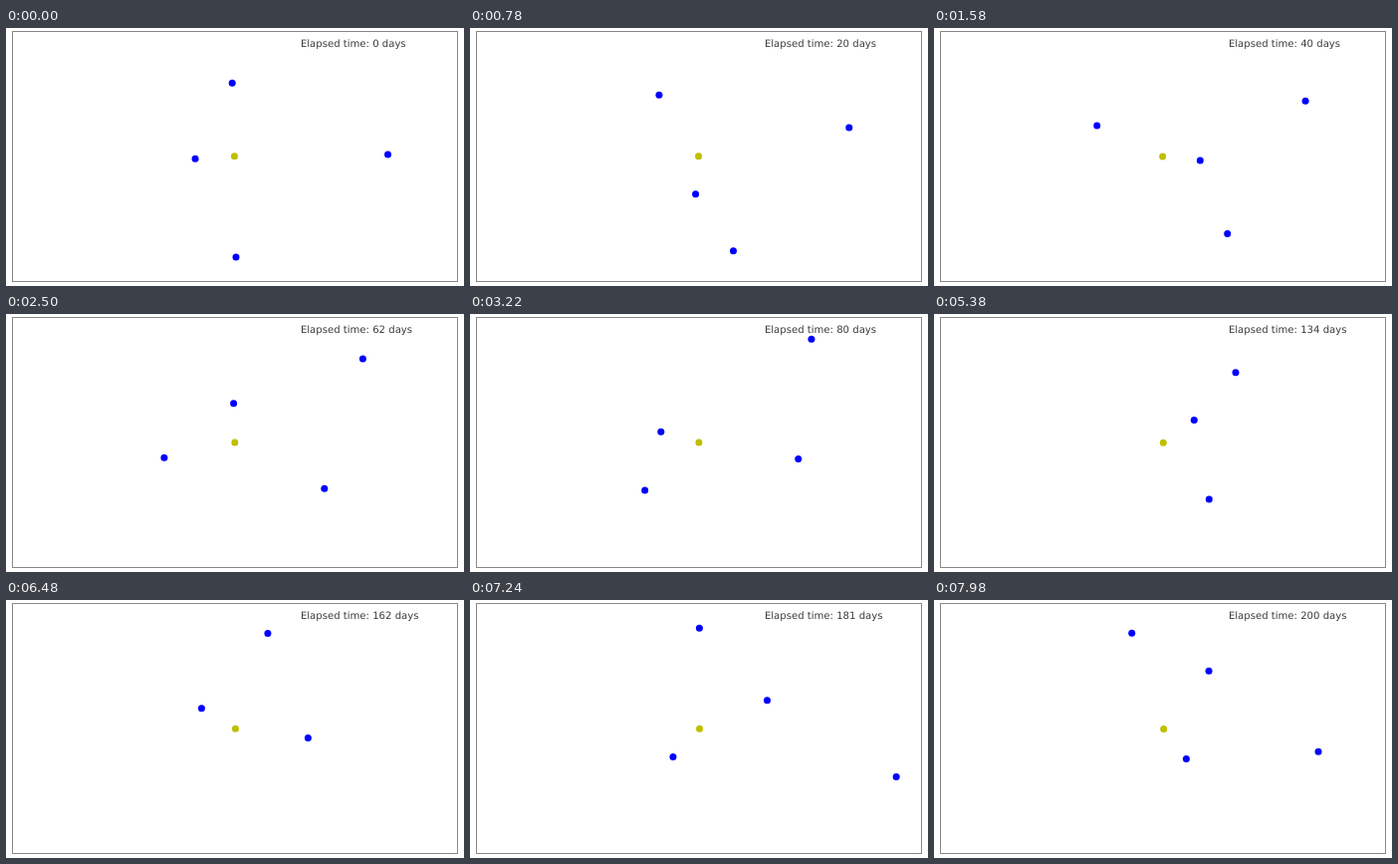
Animation of 460x259 px, one loop 8000 ms. Source, as an HTML page with a canvas:

```html
<!DOCTYPE html>
<html lang="en">
<head>
<meta charset="utf-8">
<title>Inner planets</title>
<style>
  html, body { margin: 0; width: 100%; height: 100%; overflow: hidden; background: #fff; }
  canvas { display: block; }
</style>
</head>
<body>
<canvas id="stage" width="460" height="259"></canvas>
<script>
const ctx = document.getElementById('stage').getContext('2d');
const LOOP = 8000, STEP = 20, DAYS_PER_STEP = 0.5;
const BOX = [6.5, 3.5, 447, 251];
const RAD = Math.PI / 180;

// Orbit radius in px, angles in degrees, rate in degrees per day
const planets = [
  { radius: 38.7,  start: 185.6, rate: 4.221,  ecc: 0.026,  perihelion: 320 },
  { radius: 73.1,  start: 92.5,  rate: 1.6025, ecc: 0.0087, perihelion: 220 },
  { radius: 101.2, start: -89.1, rate: 0.99,   ecc: 0,      perihelion: 0 },
  { radius: 154,   start: 1.3,   rate: 0.52,   ecc: 0.006,  perihelion: 100 },
];

function dot(x, y, color) {
  ctx.fillStyle = color;
  ctx.beginPath();
  ctx.arc(x, y, 3.5, 0, 2 * Math.PI);
  ctx.fill();
}

// Near-circular Kepler orbit, first order in eccentricity
function planetPosition(p, day, sun) {
  const mean = (p.start + p.rate * day) * RAD;
  const anomaly = mean - p.perihelion * RAD;
  const angle = mean + 2 * p.ecc * Math.sin(anomaly);
  const r = p.radius * (1 - p.ecc * Math.cos(anomaly));
  return [sun[0] + r * Math.cos(angle), sun[1] - r * Math.sin(angle)];
}

// Fast body that falls in from the lower right
function cometPosition(day) {
  const left = 199.5 - day;
  return [386 + 2.38 * left - 0.0055 * left ** 2, 152.3 + 1.38 * left - 0.001 * left ** 2];
}

function roundHalfEven(v) {
  const r = Math.round(v);
  return v % 1 === 0.5 && r % 2 ? r - 1 : r;
}

function draw(ms) {
  const day = Math.floor((ms % LOOP) / STEP) * DAYS_PER_STEP;
  const sun = [229.4 + 0.0063 * day, 128.75 + 0.0032 * day];

  ctx.fillStyle = '#fff';
  ctx.fillRect(0, 0, 460, 259);

  ctx.save();
  ctx.beginPath();
  ctx.rect(...BOX);
  ctx.clip();
  dot(...sun, '#bfbf00');
  for (const p of planets) dot(...planetPosition(p, day, sun), '#00f');
  if (day > 160) dot(...cometPosition(day), '#00f');
  ctx.restore();

  ctx.strokeStyle = '#888';
  ctx.lineWidth = 1;
  ctx.strokeRect(...BOX);

  ctx.fillStyle = '#3c3c3c';
  ctx.font = '10.1px "DejaVu Sans", sans-serif';
  ctx.textRendering = 'geometricPrecision';
  ctx.fillText(`Elapsed time: ${roundHalfEven(day)} days`, 295.9, 19.2);
}

function tick() {
  draw(performance.now());
  requestAnimationFrame(tick);
}
tick();
</script>
</body>
</html>
```
